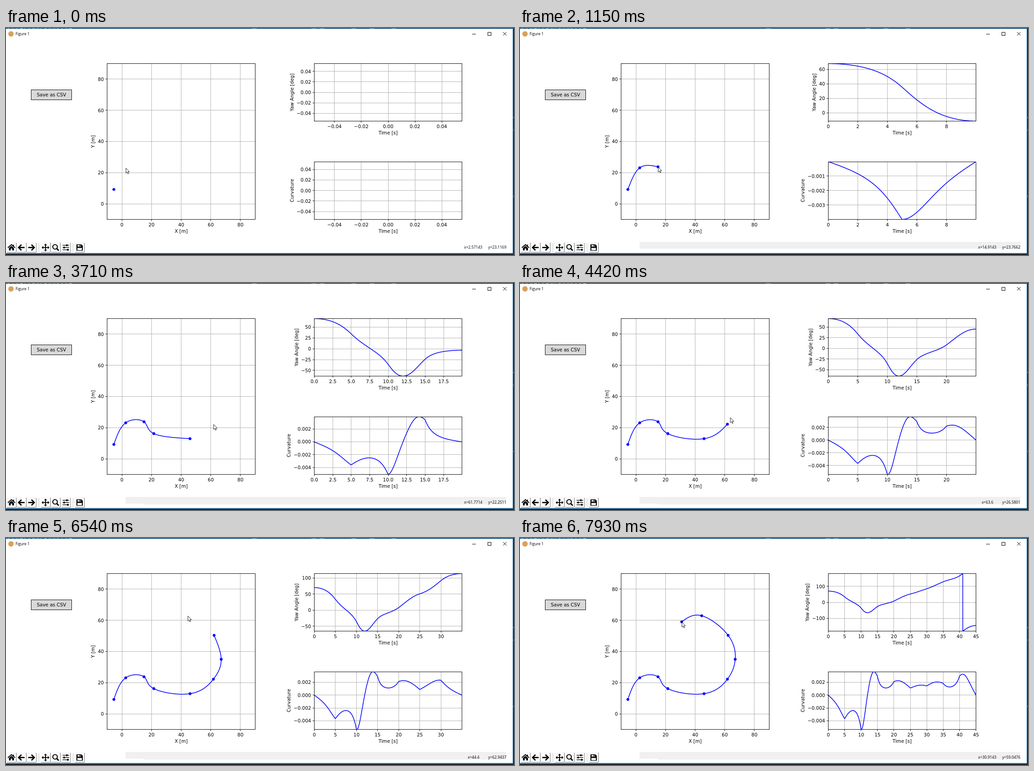
These frames come from a looping animation (1118 by 501 pixels, 8000 ms). An HTML page with a canvas:

```html
<!DOCTYPE html>
<html lang="en">
<head>
<meta charset="utf-8">
<title>Figure 1</title>
<style>
html, body { margin: 0; width: 100%; height: 100%; overflow: hidden; background: #fff; }
canvas { display: block; width: 1118px; height: 501px; }
</style>
</head>
<body>
<canvas id="stage" width="1118" height="501"></canvas>
<script>
const ctx = document.getElementById('stage').getContext('2d');
const LOOP = 8000;
const PLOT_FONT = '10.35px "DejaVu Sans", sans-serif';
const UI_FONT = '8.35px "Open Sans", "Noto Sans", sans-serif';
const BLUE = '#0000ff';

// Map plot: the pointer moves on a grid of GRID_W x GRID_H cells over 100 x 100 m.
const MAP = { x: 222.5, y: 78.5, w: 326, h: 344 };
const YAW = { x: 678.5, y: 78.5, w: 325, h: 127 };
const CURV = { x: 678.5, y: 295, w: 325, h: 127.5 };
const GRID_W = 437.5, GRID_H = 462;
const CELLS = [[20, 89], [55, 153], [109, 156], [138, 121], [245, 106],
  [314, 149], [337, 208], [316, 279], [238, 337], [179, 319]];
const toMetres = ([i, j]) => [-10 + i * 100 / GRID_W, -10 + j * 100 / GRID_H];
const POINTS = CELLS.map(toMetres);

const CLICKS = [130, 1150, 2160, 3150, 4140, 5120, 5980, 6970, 7930];
// Pointer moves: first step, last step, number of steps.
const MOVES = [[430, 710, 3], [1450, 1730, 3], [2440, 2850, 4], [3430, 3710, 3],
  [4420, 4690, 3], [5270, 5680, 4], [6260, 6540, 3], [7240, 7650, 4]];

const PER_SEGMENT = 400, SEGMENT_TIME = 5, DT = SEGMENT_TIME / PER_SEGMENT;

// Natural cubic spline with unit knot spacing.
function spline(p) {
  const n = p.length - 1, c = [0], g = [0], m = Array(n + 1).fill(0);
  for (let i = 1; i < n; i++) {
    const den = 4 - c[i - 1];
    c[i] = 1 / den;
    g[i] = (6 * (p[i + 1] - 2 * p[i] + p[i - 1]) - g[i - 1]) / den;
  }
  for (let i = n - 1; i > 0; i--) m[i] = g[i] - c[i] * m[i + 1];
  return u => {
    const i = Math.min(Math.floor(u), n - 1), w = u - i;
    const slope = p[i + 1] - p[i] - (2 * m[i] + m[i + 1]) / 6;
    return p[i] + w * (slope + w * (m[i] / 2 + w * (m[i + 1] - m[i]) / 6));
  };
}

const extent = values => values.reduce(
  ([lo, hi], v) => [Math.min(lo, v), Math.max(hi, v)], [Infinity, -Infinity]);

const courses = new Map();
function course(segments) {
  if (courses.has(segments)) return courses.get(segments);
  const pts = POINTS.slice(0, segments + 1);
  const fx = spline(pts.map(p => p[0])), fy = spline(pts.map(p => p[1]));
  // At nine segments rounding lets the closing sample in.
  const count = segments * PER_SEGMENT + (segments === 9 ? 1 : 0);
  const path = Array.from({ length: count + 1 }, (_, i) => [fx(i / PER_SEGMENT), fy(i / PER_SEGMENT)]);
  const yaw = [], curvature = [];
  for (let i = 0; i < count; i++) {
    const [a, b] = [path[i], path[i + 1]];
    yaw.push(Math.atan2(b[1] - a[1], b[0] - a[0]));
  }
  for (let i = 0; i < count - 1; i++) {
    const d = yaw[i + 1] - yaw[i];
    curvature.push(d - 2 * Math.PI * Math.round(d / (2 * Math.PI)));
  }
  curvature.push(curvature[count - 2]);
  const degrees = yaw.map(a => a * 180 / Math.PI);
  const result = {
    path, degrees, curvature, span: [0, (count - 1) * DT],
    yawRange: extent(degrees), curvatureRange: extent(curvature)
  };
  courses.set(segments, result);
  return result;
}

function text(str, x, y, align = 'center', font = PLOT_FONT) {
  ctx.font = font;
  ctx.textAlign = align;
  ctx.fillStyle = '#000';
  ctx.fillText(str, x, y);
}

function line(points, color, width) {
  ctx.beginPath();
  points.forEach(([x, y]) => ctx.lineTo(x, y));
  ctx.strokeStyle = color;
  ctx.lineWidth = width;
  ctx.stroke();
}

function shape(points, color) {
  ctx.beginPath();
  points.forEach(([x, y]) => ctx.lineTo(x, y));
  ctx.closePath();
  ctx.fillStyle = color;
  ctx.fill();
}

function rect(x, y, w, h, color) {
  ctx.fillStyle = color;
  ctx.fillRect(x, y, w, h);
}

function disc(x, y, r, color) {
  ctx.beginPath();
  ctx.arc(x, y, r, 0, 2 * Math.PI);
  ctx.fillStyle = color;
  ctx.fill();
}

const minus = s => s.replace('-', '\u2212');

// Round tick values; tiny ranges get an offset and a power of ten.
function ticks([lo, hi], bins) {
  const span = hi - lo, mid = (lo + hi) / 2, tiny = span < 1e-6;
  const base = tiny && Math.abs(mid) > 1e3 * span ? Number(mid.toPrecision(13)) : 0;
  const power = 10 ** Math.floor(Math.log10(span / bins));
  const step = [1, 2, 2.5, 5, 10].find(s => s * power * bins >= span * (1 - 1e-9)) * power;
  const exp = tiny ? Math.floor(Math.log10(Math.max(hi - base, base - lo))) : 0;
  const unit = 10 ** exp, size = step / unit;
  let digits = 0;
  while (digits < 4 && Math.abs(size * 10 ** digits - Math.round(size * 10 ** digits)) > 1e-6) digits++;
  const first = Math.ceil((lo - base) / step - 1e-9), last = Math.floor((hi - base) / step + 1e-9);
  const list = [];
  for (let k = first; k <= last; k++) {
    list.push({ value: base + k * step, label: minus((k * size || 0).toFixed(digits)) });
  }
  let note = tiny ? minus('1e' + exp) : '';
  if (base) note += '+' + base.toExponential(10).replace(/0+e/, 'e').replace('e+', 'e');
  return { list, note };
}

const snap = v => Math.floor(v) + 0.5;

function axes(box, xlim, ylim, xlabel, ylabel, data, dots = []) {
  const { x, y, w, h } = box, right = x + w, bottom = y + h;
  const px = v => x + (v - xlim[0]) / (xlim[1] - xlim[0]) * w;
  const py = v => bottom - (v - ylim[0]) / (ylim[1] - ylim[0]) * h;
  const xt = ticks(xlim, 9), yt = ticks(ylim, 6);
  let widest = 0;
  for (const { value, label } of xt.list) {
    const p = snap(px(value));
    line([[p, y], [p, bottom]], '#b0b0b0', 0.95);
    line([[p, bottom], [p, bottom + 3.6]], '#000', 0.9);
    text(label, px(value), bottom + 15.3);
  }
  for (const { value, label } of yt.list) {
    const p = snap(py(value));
    line([[x, p], [right, p]], '#b0b0b0', 0.95);
    line([[x - 3.6, p], [x, p]], '#000', 0.9);
    text(label, x - 7.2, py(value) + 3.8, 'right');
    widest = Math.max(widest, ctx.measureText(label).width);
  }
  if (yt.note) text(yt.note, x, y - 3, 'left');

  ctx.save();
  ctx.beginPath();
  ctx.rect(x, y, w, h);
  ctx.clip();
  ctx.lineJoin = 'round';
  if (data.length) line(data.map(([a, b]) => [px(a), py(b)]), BLUE, 1.55);
  dots.forEach(([a, b]) => disc(px(a), py(b), 3.1, BLUE));
  ctx.restore();

  ctx.strokeStyle = '#000';
  ctx.lineWidth = 0.95;
  ctx.strokeRect(x, snap(y), w, snap(bottom) - snap(y));
  text(xlabel, x + w / 2, bottom + 29.6);
  ctx.save();
  ctx.translate(x - 14 - widest, y + h / 2);
  ctx.rotate(-Math.PI / 2);
  text(ylabel, 0, 0);
  ctx.restore();
}

function arrowIcon(cx, dir) {
  const at = pts => pts.map(([a, b]) => [cx + dir * a, 484.5 + b]);
  line(at([[-7, 0], [6, 0]]), '#000', 2.8);
  line(at([[0, -6.3], [6.3, 0], [0, 6.3]]), '#000', 2.8);
}

function toolbar() {
  for (const cx of [12, 34, 56, 87, 109, 131.5, 162]) {
    line([[cx - 10, 495], [cx + 10.5, 495], [cx + 10.5, 474]], '#777', 1);
    line([[cx - 10.5, 494], [cx - 10.5, 474.5], [cx + 10, 474.5]], '#ededed', 1);
  }
  for (const x of [72.5, 147.5]) line([[x, 475], [x, 495]], '#c4c4c4', 1);

  line([[4, 485], [12, 478], [20, 485]], '#000', 2);
  shape([[6.5, 485.5], [12, 480.8], [17.5, 485.5], [17.5, 491], [13.7, 491],
    [13.7, 486.7], [10.3, 486.7], [10.3, 491], [6.5, 491]], '#000');
  rect(15.5, 478, 2, 4, '#000');
  arrowIcon(34, -1);
  arrowIcon(56, 1);

  line([[80, 484.5], [94, 484.5]], '#000', 2);
  line([[87, 477.5], [87, 491.5]], '#000', 2);
  for (let k = 0; k < 4; k++) {
    ctx.save();
    ctx.translate(87, 484.5);
    ctx.rotate(k * Math.PI / 2);
    shape([[8.5, 0], [5, -3.4], [5, 3.4]], '#000');
    ctx.restore();
  }
  ctx.beginPath();
  ctx.arc(108, 483, 5, 0, 2 * Math.PI);
  ctx.strokeStyle = '#000';
  ctx.lineWidth = 2.2;
  ctx.stroke();
  line([[111.5, 486.5], [116, 491.2]], '#000', 3);

  [[479.5, 134], [484.5, 128], [489.5, 136]].forEach(([y, knob]) => {
    line([[124.5, y], [139, y]], '#000', 1.4);
    rect(knob - 1.5, y - 2, 3, 4, '#000');
  });

  shape([[155, 477.5], [166, 477.5], [169, 480.5], [169, 491.5], [155, 491.5]], '#000');
  rect(157.5, 479, 7.5, 3.5, '#fff');
  rect(162, 479, 2, 3, '#000');
  rect(157, 485.5, 10, 4.8, '#fff');
}

function windowFrame() {
  rect(0, 0, 1118, 501, '#25282e');
  for (let k = 0; k < 16; k++) rect(4 + k * 9, 0, 3 + k * 5 % 4, 1, k % 3 ? '#8a6a4a' : '#a9a9a9');
  for (const x of [541, 672, 690, 760, 800, 848]) rect(x, 0, 11, 1, '#77797d');
  for (const y of [196, 224, 370]) rect(1116.5, y, 1.5, 3, '#9a6048');
  rect(0, 1, 1116, 497, '#3d9be0');
  rect(0, 2, 1115, 494.5, '#fff');
  disc(11, 13, 6, '#d8a25c');
  text('Figure 1', 21, 16.2, 'left', UI_FONT);
  line([[1026, 13.5], [1034, 13.5]], '#000', 1);
  ctx.strokeRect(1060.5, 9.5, 7, 7);
  line([[1094, 9], [1101.5, 16.5]], '#000', 1);
  line([[1101.5, 9], [1094, 16.5]], '#000', 1);

  rect(55, 136.5, 89.5, 22, '#d9d9d9');
  ctx.strokeStyle = '#000';
  ctx.lineWidth = 0.95;
  ctx.strokeRect(55.5, 136.5, 89, 22);
  text('Save as CSV', 100, 150.5);
}

function pointerCell(t) {
  let cell = CELLS[1];
  MOVES.forEach(([start, end, steps], i) => {
    if (t < start) return;
    const done = Math.min(steps, Math.floor((t - start) / (end - start) * (steps - 1) + 0.03) + 1);
    const [a, b] = [CELLS[i + 1], CELLS[i + 2]];
    cell = a.map((v, k) => Math.round(v + (b[k] - v) * done / steps));
  });
  return cell;
}

function pointer([i, j]) {
  const x = MAP.x + i * MAP.w / GRID_W, y = MAP.y + MAP.h - j * MAP.h / GRID_H;
  const outline = [[0.5, 0.5], [0.5, 11.7], [3, 9.4], [4.8, 13.4], [6.5, 12.6], [4.8, 8.7], [8.2, 8.7]]
    .map(([a, b]) => [x + a, y + b]);
  shape(outline, '#fff');
  line([...outline, outline[0]], '#000', 0.85);
}

function status(t, cell) {
  if (t >= 430) rect(263, 472, 838, 15, '#f0f0f0');
  if (t >= 1450) rect(303, 472, 798, 17, '#f0f0f0');
  const [x, y] = toMetres(cell).map(v => String(Number(v.toPrecision(6))).padEnd(12));
  text(`x=${x} y=${y}`, 1112, 487, 'right', UI_FONT);
}

function draw(t) {
  const segments = CLICKS.filter(c => t >= c).length;
  const blank = [-0.055, 0.055];
  const c = segments ? course(segments) : {
    path: [], degrees: [], curvature: [], span: blank, yawRange: blank, curvatureRange: blank
  };
  const overTime = values => values.map((v, i) => [i * DT, v]);
  const cell = pointerCell(t);
  ctx.lineJoin = 'miter';
  windowFrame();
  axes(MAP, [-10, 90], [-10, 90], 'X [m]', 'Y [m]', c.path, POINTS.slice(0, segments + 1));
  axes(YAW, c.span, c.yawRange, 'Time [s]', 'Yaw Angle [deg]', overTime(c.degrees));
  axes(CURV, c.span, c.curvatureRange, 'Time [s]', 'Curvature', overTime(c.curvature));
  toolbar();
  status(t, cell);
  pointer(cell);
}

const began = performance.now();
function tick() {
  draw((performance.now() - began) % LOOP);
  requestAnimationFrame(tick);
}
tick();
</script>
</body>
</html>
```
